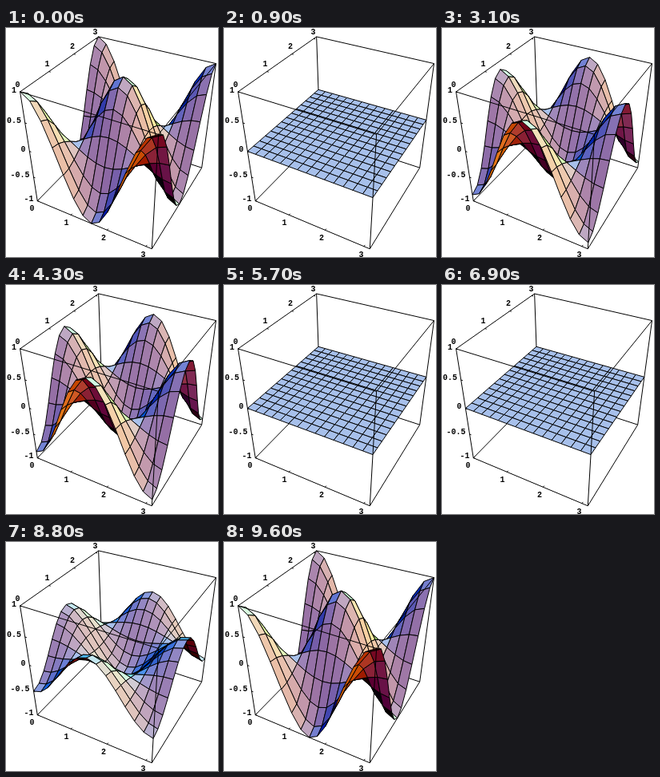
An HTML page with a canvas that plays this animation: 265 px wide and 287 px high, repeating every 9700 ms.

```html
<!DOCTYPE html>
<html lang="en">
<head>
<meta charset="utf-8">
<title>Vibrating surface</title>
<style>
  html, body { margin: 0; width: 100%; height: 100%; overflow: hidden; background: #fff; }
  canvas { display: block; }
</style>
</head>
<body>
<canvas id="stage" width="265" height="287"></canvas>
<script>
const ctx = document.getElementById('stage').getContext('2d');
const CELLS = 14, STEP_MS = 100, STEPS = 97, STEPS_PER_CYCLE = 12;
const CENTER_X = 146.5, CENTER_Y = 134, SCALE = 556.5;

// Camera basis for the viewpoint (1.3, -2.4, 2), looking at a unit cube
const dot = (a, b) => a[0] * b[0] + a[1] * b[1] + a[2] * b[2];
const cross = (a, b) => [
  a[1] * b[2] - a[2] * b[1],
  a[2] * b[0] - a[0] * b[2],
  a[0] * b[1] - a[1] * b[0]
];
const sub = (a, b) => a.map((v, i) => v - b[i]);
const unit = a => a.map(v => v / Math.hypot(...a));
const eye = [1.3, -2.4, 2];
const forward = unit(eye.map(v => -v));
const right = unit(cross(forward, [0, 0, 1]));
const up = cross(right, forward);

// Perspective coordinates; the third grows towards the viewer
function project(p) {
  const depth = Math.hypot(...eye) + dot(forward, p);
  return [dot(right, p) / depth, dot(up, p) / depth, 1 / depth];
}
const toScreen = q => [CENTER_X + SCALE * q[0], CENTER_Y - SCALE * q[1]];

// Red, green and blue lamps
const lamps = [[1, 0, 1], [1, 1, 1], [0, 1, 1]].map(unit);

function shade(a, b, c, d) {
  let normal = unit(cross(sub(c, a), sub(d, b)));
  if (normal[2] < 0) normal = normal.map(v => -v);
  return `rgb(${lamps.map(l => Math.round(255 * Math.max(0, dot(normal, l))))})`;
}

function line(a, b) {
  ctx.beginPath();
  ctx.moveTo(...toScreen(project(a)));
  ctx.lineTo(...toScreen(project(b)));
  ctx.stroke();
}

// Box edges that touch the hidden far corner lie behind the surface
const h = 0.5, farCorner = [-h, h, -h];
const backEdges = [], frontEdges = [];
for (let axis = 0; axis < 3; axis++) {
  for (const s of [-h, h]) for (const t of [-h, h]) {
    const a = [0, 0, 0];
    a[axis] = -h;
    a[(axis + 1) % 3] = s;
    a[(axis + 2) % 3] = t;
    const b = a.slice();
    b[axis] = h;
    const hidden = [a, b].some(p => p.every((v, i) => v === farCorner[i]));
    (hidden ? backEdges : frontEdges).push([a, b]);
  }
}

const labels = [
  ['1', 10, 77], ['0.5', 10, 115], ['0', 21.5, 151], ['-0.5', 17.5, 183], ['-1', 28.5, 213],
  ['0', 14.5, 70], ['1', 51.5, 44], ['2', 83, 22], ['3', 111.5, 4],
  ['0', 32.5, 225], ['1', 75.5, 243], ['2', 122, 262], ['3', 171.5, 283]
];

function drawAxes() {
  const tick = 0.015;
  for (let n = 0; n <= 3; n++) {
    const v = n / Math.PI - h;
    line([v, -h, -h], [v, -h + tick, -h]);
    line([-h, v, h], [-h + tick, v, h]);
  }
  for (let z = -h; z <= h; z += 0.25) line([-h, -h, z], [-h + tick, -h, z]);
  ctx.fillStyle = '#000';
  ctx.font = 'bold 10px "Liberation Mono", monospace';
  ctx.textAlign = 'center';
  for (const [text, x, y] of labels) ctx.fillText(text, x, y + 3.5);
}

function drawSurface(amplitude) {
  const wave = i => Math.cos(2 * Math.PI * i / CELLS);
  const vertex = (i, j) =>
    project([i / CELLS - h, j / CELLS - h, amplitude * wave(i) * wave(j) / 2]);
  // Far cells first
  for (let j = CELLS - 1; j >= 0; j--) {
    for (let i = 0; i < CELLS; i++) {
      const quad = [vertex(i, j), vertex(i + 1, j), vertex(i + 1, j + 1), vertex(i, j + 1)];
      ctx.beginPath();
      quad.forEach(q => ctx.lineTo(...toScreen(q)));
      ctx.closePath();
      ctx.fillStyle = shade(...quad);
      ctx.fill();
      ctx.stroke();
    }
  }
}

function draw(now) {
  const step = Math.floor(now / STEP_MS) % STEPS;
  ctx.fillStyle = '#fff';
  ctx.fillRect(0, 0, 265, 287);
  ctx.strokeStyle = '#000';
  ctx.lineWidth = 1;
  ctx.lineJoin = 'round';
  backEdges.forEach(e => line(...e));
  drawSurface(Math.cos(2 * Math.PI * step / STEPS_PER_CYCLE));
  frontEdges.forEach(e => line(...e));
  drawAxes();
}

let start;
function loop(now) {
  start ??= now;
  draw(now - start);
  requestAnimationFrame(loop);
}
draw(0);
requestAnimationFrame(loop);
</script>
</body>
</html>
```
